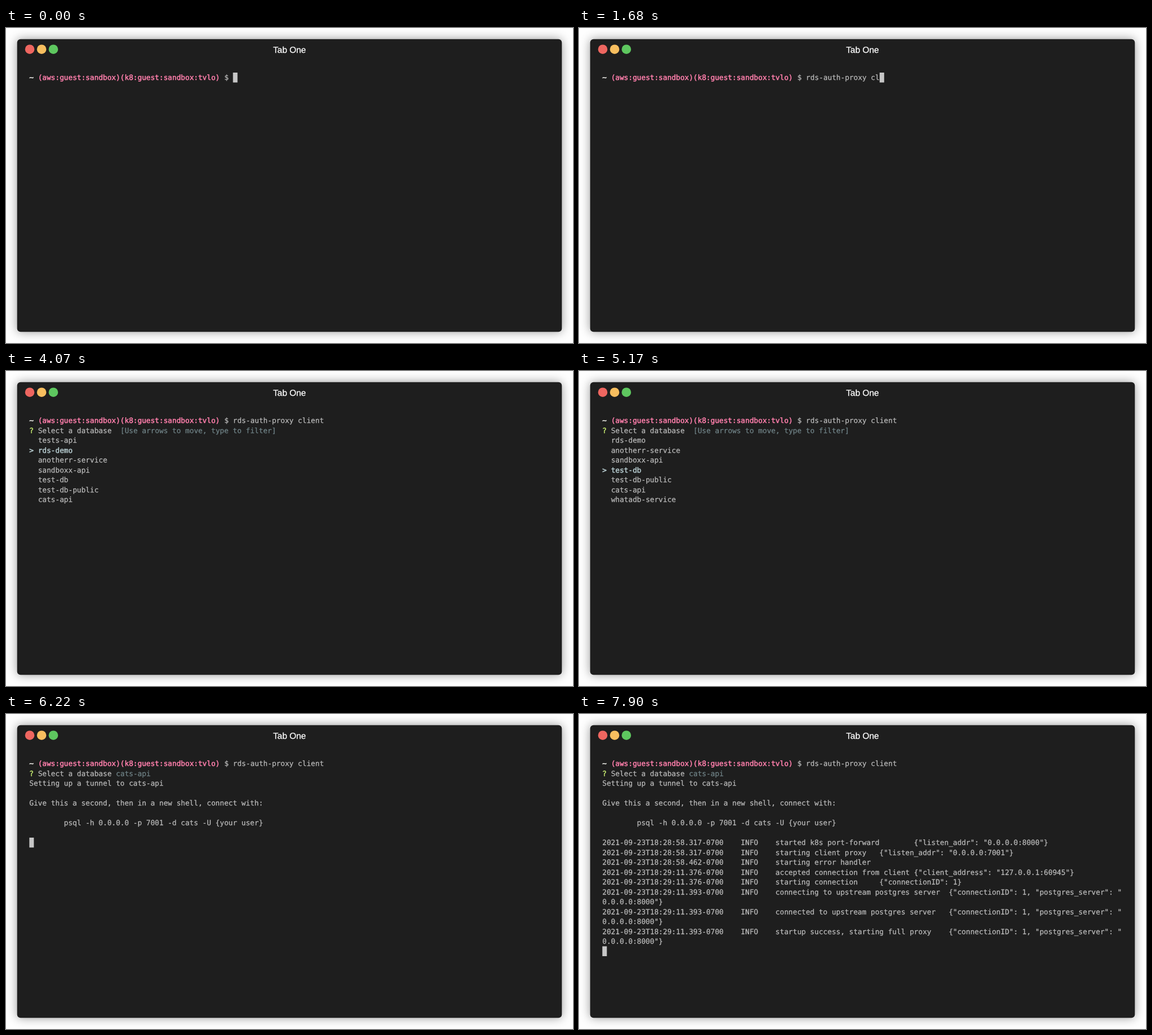
Animation, 1003 px wide and 558 px high, one loop 8 s. Source, as an HTML page:

```html
<!DOCTYPE html>
<html lang="en">
<head>
<meta charset="utf-8">
<title>Terminal session</title>
<style>
  html, body { margin: 0; width: 100%; height: 100%; overflow: hidden; background: #fefefe; }
  svg { display: block; width: 100%; height: 100%; }
  text { fill: currentColor; stroke: currentColor; stroke-width: .25px; text-rendering: geometricPrecision; }
  #screen text { font: 12.73px "DejaVu Sans Mono", monospace; white-space: pre; color: #bababa; }
  #screen .tilde, #screen .pink, #screen .mark, #screen .pick { stroke-width: .5px; }
  #screen .tilde { color: #f9f9f4; }
  #screen .pink { color: #ff7fac; }
  #screen .mark { color: #c8ed71; }
  #screen .dim { color: #708387; }
  #screen .pick { color: #b8cdd1; }
  #title { font: 15.4px "Liberation Sans", sans-serif; color: #fff; text-anchor: middle; }
</style>
</head>
<body>
<svg viewBox="0 0 1003 558">
  <defs>
    <filter id="blur" x="-10%" y="-10%" width="120%" height="120%">
      <feGaussianBlur stdDeviation="9"/>
    </filter>
  </defs>
  <rect width="1003" height="558" fill="#fefefe"/>
  <rect x="19.7" y="19.7" width="963.6" height="518.6" rx="6" opacity=".4" filter="url(#blur)"/>
  <rect x="19.7" y="19.7" width="963.6" height="518.6" rx="6" fill="#1e1e1e"/>
  <circle cx="42" cy="37.7" r="8.3" fill="#ee6660"/>
  <circle cx="63" cy="37.7" r="8.3" fill="#f7be5f"/>
  <circle cx="83.8" cy="37.7" r="8.3" fill="#5ec75f"/>
  <text id="title" x="501.5" y="43.7">Tab One</text>
  <g id="screen"></g>
</svg>
<script>
const LOOP = 8000, CELL = 7.664, LINE = 17.5, LEFT = 41.3, TOP = 79, COLS = 120, PAGE = 7;
const PROMPT = "(aws:guest:sandbox)(k8:guest:sandbox:tvlo)";
const COMMAND = "rds-auth-proxy client";
const ENTER = 2530, DONE = 6220;
const DATABASES = ["tests-api", "rds-demo", "anotherr-service", "sandboxx-api", "test-db",
  "test-db-public", "cats-api", "whatadb-service", "dogs-api"];
const MENU_TIMES = [3130, 4070, 4700, 4960, 5170, 5370, 5790];

const series = (start, gap, n) => Array.from({ length: n }, (_, i) => start + gap * i);
const KEY_TIMES = [...series(100, 100, 9), ...series(1000, 97, 8), 1780, 1840, 1930, 2030];

const info = (time, message) => `2021-09-23T18:${time}-0700\tINFO\t${message}`;
const upstream = message =>
  info("29:11.393", message + '\t{"connectionID": 1, "postgres_server": "0.0.0.0:8000"}');
const OUTPUT = [
  [DONE, ["Setting up a tunnel to cats-api", "",
    "Give this a second, then in a new shell, connect with:", "",
    "\tpsql -h 0.0.0.0 -p 7001 -d cats -U {your user}", ""]],
  [7430, [info("28:58.317", 'started k8s port-forward\t{"listen_addr": "0.0.0.0:8000"}'),
    info("28:58.317", 'starting client proxy\t{"listen_addr": "0.0.0.0:7001"}')]],
  [7580, [info("28:58.462", "starting error handler")]],
  [7880, [info("29:11.376", 'accepted connection from client\t{"client_address": "127.0.0.1:60945"}'),
    info("29:11.376", 'starting connection\t{"connectionID": 1}')]],
  [7900, ["connecting to upstream postgres server", "connected to upstream postgres server",
    "startup success, starting full proxy"].map(upstream)]
];

const screen = document.getElementById("screen");
const countPast = (times, t) => times.filter(x => x <= t).length;

function add(tag, attrs, text = "") {
  const el = document.createElementNS("http://www.w3.org/2000/svg", tag);
  for (const name in attrs) el.setAttribute(name, attrs[name]);
  el.textContent = text;
  screen.append(el);
}

function write(row, col, text, cls = "") {
  add("text", { x: LEFT + col * CELL, y: TOP + 13 + row * LINE, class: cls }, text);
}

function cursor(row, col) {
  add("rect", { x: LEFT + col * CELL, y: TOP + row * LINE, width: 8, height: LINE, fill: "#c7c7c7" });
}

// Tab stops fall on every eighth column, with at least one blank.
function expandTabs(line) {
  return line.split("\t").reduce((out, part) => out.padEnd((out.length >> 3) * 8 + 8) + part);
}

function drawMenu(selected) {
  write(1, 0, "?", "mark");
  write(1, 2, "Select a database");
  write(1, 21, "[Use arrows to move, type to filter]", "dim");
  const first = Math.max(0, Math.min(selected - 3, DATABASES.length - PAGE));
  DATABASES.slice(first, first + PAGE).forEach((name, i) => {
    const active = first + i === selected;
    if (active) write(i + 2, 0, ">", "pick");
    write(i + 2, 2, name, active ? "pick" : "");
  });
}

function drawOutput(t) {
  write(1, 0, "?", "mark");
  write(1, 2, "Select a database");
  write(1, 20, "cats-api", "dim");
  let row = 2;
  for (const [time, lines] of OUTPUT) {
    if (t < time) break;
    for (const line of lines) {
      const text = expandTabs(line);
      for (let i = 0; i === 0 || i < text.length; i += COLS) write(row++, 0, text.slice(i, i + COLS));
    }
  }
  cursor(row, 0);
}

function draw(t) {
  screen.replaceChildren();
  const typed = countPast(KEY_TIMES, t);
  write(0, 0, "~", "tilde");
  write(0, 2, PROMPT, "pink");
  write(0, 45, "$");
  write(0, 47, COMMAND.slice(0, typed));
  if (t < ENTER) cursor(0, 47 + typed);
  else if (t < MENU_TIMES[0]) cursor(1, 0);
  else if (t < DONE) drawMenu(countPast(MENU_TIMES, t) - 1);
  else drawOutput(t);
}

const CHANGES = [...KEY_TIMES, ENTER, ...MENU_TIMES, ...OUTPUT.map(([time]) => time)];
const start = performance.now();
let shown = -1;

function tick() {
  const t = (performance.now() - start) % LOOP;
  const step = countPast(CHANGES, t);
  if (step !== shown) {
    draw(t);
    shown = step;
  }
  requestAnimationFrame(tick);
}
tick();
</script>
</body>
</html>
```
